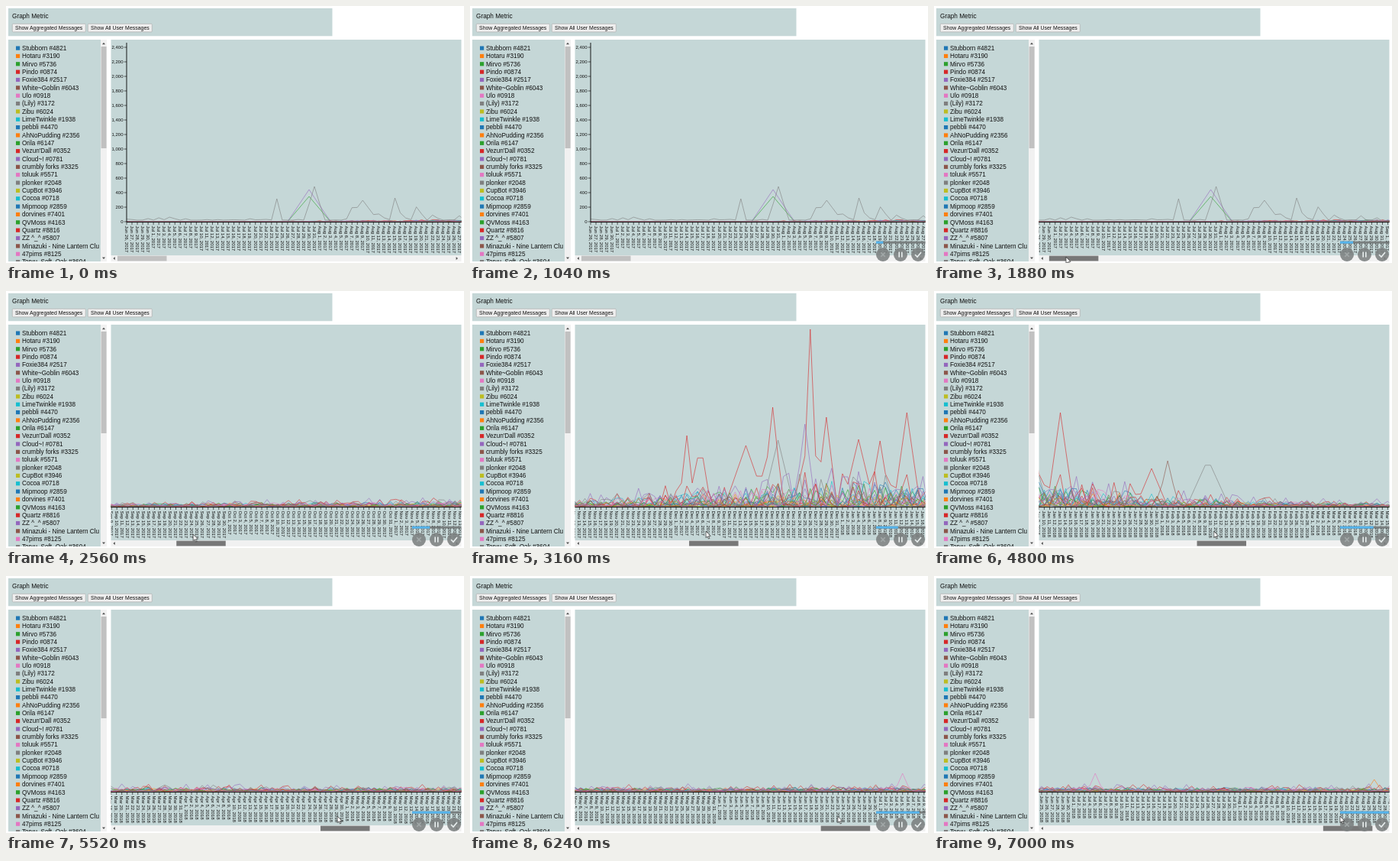
Recreate the animation shown at these times as an HTML page. Size 600x336 px, loop 7.08 s.

```html
<!DOCTYPE html>
<html lang="en">
<head>
<meta charset="utf-8">
<title>Graph Metric</title>
<style>
@property --scroll { syntax: '<number>'; inherits: true; initial-value: 0; }
html, body { margin: 0; width: 100%; height: 100%; overflow: hidden; background: #fff; }
#stage {
  display: block; width: 600px; height: 336px;
  font-family: 'Liberation Sans', Arial, sans-serif;
  animation: scroll 7080ms linear infinite;
}
text { fill: #111; white-space: pre; }
.panel { fill: #c5d7d7; }
.track { fill: #f1f1f1; }
.bar { fill: #c1c1c1; }
.arrow { fill: #505050; }
.button { fill: #eee; stroke: #a5a5a5; stroke-width: .6; }
.series { fill: none; stroke-width: .75; stroke-linejoin: round; opacity: .8; }
.axis { fill: none; stroke: #000; stroke-width: .9; }
.tick { fill: none; stroke: #000; stroke-width: .6; }
.small { font-size: 6px; }
#world { transform: translateX(calc(var(--scroll) * -1px)); }
#thumb, #pointer { transform: translateX(calc(var(--scroll) * 1px / 7.08)); }
#thumb { animation: press 7080ms step-end infinite; }
#pointer { animation: show-pointer 7080ms step-end infinite; }
#pointer path { animation: lift 7080ms linear infinite; }
#recorder { animation: show-recorder 7080ms step-end infinite; }
#progress { transform-origin: 532px 0; animation: fill 7080ms linear infinite; }
@keyframes scroll {
  0%, 23.2% { --scroll: 0; }
  26.55% { --scroll: 33.5; }
  44.63% { --scroll: 998.5; }
  56.5% { --scroll: 1150.5; }
  67.8% { --scroll: 1405; }
  77.97% { --scroll: 1883; }
  98.87%, 100% { --scroll: 2576; }
}
@keyframes press { 0% { fill: #c1c1c1; } 23%, 100% { fill: #787878; } }
@keyframes show-pointer { 0% { opacity: 0; } 20%, 100% { opacity: 1; } }
@keyframes lift { 0%, 26.55% { transform: translateY(14px); } 40%, 100% { transform: none; } }
@keyframes show-recorder { 0% { opacity: 0; } 1.1%, 100% { opacity: 1; } }
@keyframes fill { from { transform: scaleX(0); } to { transform: scaleX(1); } }
</style>
</head>
<body>
<svg id="stage" viewBox="0 0 600 336">
  <rect class="panel" x="3" y="3" width="424.5" height="36.3"/>
  <text x="8" y="16" font-size="8.25">Graph Metric</text>
  <rect class="button" x="8.3" y="23.3" width="96" height="10.6" rx="1"/>
  <rect class="button" x="107.3" y="23.3" width="84" height="10.6" rx="1"/>
  <g font-size="6.95">
    <text x="12" y="31.2">Show Aggregated Messages</text>
    <text x="111" y="31.2">Show All User Messages</text>
  </g>

  <svg x="3" y="44" width="121" height="290" viewBox="3 44 121 290">
    <rect class="panel" x="3" y="44" width="121" height="290"/>
    <g id="legend" font-size="8.2"></g>
  </svg>
  <rect class="track" x="124" y="44" width="8" height="290"/>
  <rect class="bar" x="124.6" y="53" width="7" height="133"/>
  <path class="arrow" d="M126 50.2l2-2.4 2 2.4z"/>
  <path class="arrow" d="M126 328.6l2 2.4 2-2.4z"/>

  <svg x="137.5" y="44" width="459" height="282" viewBox="137.5 44 459 282">
    <rect class="panel" x="137" y="44" width="460" height="282"/>
    <g id="world"></g>
  </svg>
  <rect class="track" x="137.5" y="326" width="459" height="8"/>
  <path class="arrow" d="M142.8 328l-2.4 2 2.4 2z"/>
  <path class="arrow" d="M589.6 328l2.4 2-2.4 2z"/>
  <rect id="thumb" x="146" y="326.6" width="64.5" height="6.8"/>

  <g id="recorder">
    <rect x="532" y="307.6" width="64.5" height="3" fill="#6c7070" opacity=".85"/>
    <rect id="progress" x="532" y="307.6" width="64.5" height="3" fill="#55b4ec"/>
    <g fill="#7c8080" opacity=".88">
      <circle cx="541" cy="325" r="9"/>
      <circle cx="564" cy="325" r="9"/>
      <circle cx="587" cy="325" r="9"/>
    </g>
    <g fill="none" stroke="#e8eeee" stroke-width="1.6">
      <path d="M538.3 322.3l5.4 5.4M543.7 322.3l-5.4 5.4" stroke="#a2a8a8"/>
      <path d="M562.2 321.5v7M565.8 321.5v7"/>
      <path d="M583 325l3 3 5-6"/>
    </g>
  </g>
  <g id="pointer">
    <path d="M168 314v8.6l2-1.8 1.4 3.2 1.4-.6-1.4-3.1h2.7z" fill="#fff" stroke="#222" stroke-width=".7"/>
  </g>
</svg>
<script>
const DAYS = 440, STEP = 7.03, LEFT = 158, BASE = 282;
const COLORS = ['#1f77b4', '#ff7f0e', '#2ca02c', '#d62728', '#9467bd',
  '#8c564b', '#e377c2', '#7f7f7f', '#bcbd22', '#17becf'];
const [ORANGE, GREEN, RED, PURPLE, BROWN, PINK, GREY] = [1, 2, 3, 4, 5, 6, 7];
const NAMES = ['Stubborn #4821', 'Hotaru #3190', 'Mirvo #5736', 'Pindo #0874', 'Foxie384 #2517',
  'White~Goblin #6043', 'Ulo #0918', '(Lily) #3172', 'Zibu #6024', 'LimeTwinkle #1938',
  'pebbli #4470', 'AhNoPudding #2356', 'Orila #6147', "Vezun'Dall #0352", 'Cloud~! #0781',
  'crumbly forks #3325', 'toluuk #5571', 'plonker #2048', 'CupBot #3946', 'Cocoa #0718',
  'Mipmoop #2859', 'dorvines #7401', 'QVMoss #4163', 'Quartz #8816', 'ZZ ^_^ #5807',
  'Minazuki - Nine Lantern Clu', '47pims #8125', 'Torvu_Soft_Oak #3604'];

// The outstanding spikes: series, day, height, half width in days
const SPIKES = [
  [GREY, 28, 30, 1], [PURPLE, 34, 42, 4], [GREEN, 34, 33, 4], [GREY, 35, 46, 2], [GREY, 44, 28, 3],
  [GREY, 50, 31, 1], [RED, 160, 93, 1.5], [RED, 162.5, 85, 2], [RED, 171, 80, 4], [RED, 176, 130, 2],
  [GREY, 177, 87, 3], [PURPLE, 182, 108, 2], [RED, 183, 232, 1.4], [RED, 186, 117, 2],
  [RED, 192, 88, 3], [RED, 196, 86, 2], [RED, 201, 123, 2.5], [RED, 218, 50, 3],
  [BROWN, 221, 60, 2], [GREY, 228.5, 62, 4], [PINK, 374, 24, 1.5], [ORANGE, 426, 16, 1.5]
];

const byId = id => document.getElementById(id);

function add(parent, tag, attrs, text) {
  const node = document.createElementNS('http://www.w3.org/2000/svg', tag);
  for (const key in attrs) node.setAttribute(key, attrs[key]);
  if (text) node.textContent = text;
  parent.append(node);
  return node;
}

function random(a, b) {
  const v = Math.sin(a * 127.1 + b * 311.7 + 7.3) * 43758.5453;
  return v - Math.floor(v);
}

// Activity grows over the first months and swells around the new year
const bell = (x, centre, width) => Math.exp(-(((x - centre) / width) ** 2));
const activity = day => Math.min(1, day / 100) ** 2 * (12 + 58 * bell(day, 187, 32));

function height(series, day) {
  const busy = [RED, PURPLE, BROWN, GREY].includes(series % 10) ? 1 : .5;
  const weight = busy * (.25 + .75 * random(series, 500));
  const noise = activity(day) * weight * random(day, series) ** 3;
  const early = series === GREY && day < 66 ? 2 + (day < 40 ? 4 : 20) * random(day, 99) ** 3 : 0;
  const spikes = SPIKES.filter(([s]) => s === series)
    .map(([, at, top, width]) => top * (1 - Math.abs(day - at) / width));
  return Math.max(noise, early, ...spikes);
}

const xOf = day => LEFT + day * STEP;
const world = byId('world');

NAMES.forEach((name, i) => {
  const y = 55 + i * 10.35, color = COLORS[i % 10];
  add(byId('legend'), 'rect', {x: 13, y: y - 2.5, width: 5.2, height: 5.2, fill: color});
  add(byId('legend'), 'text', {x: 21, y: y + 2.8}, name);
  const points = Array.from({length: DAYS}, (_, d) => `${xOf(d).toFixed(2)},${(BASE - height(i, d)).toFixed(2)}`);
  add(world, 'polyline', {class: 'series', stroke: color, points: points.join(' ')});
});

let ticks = '';
for (let d = 0; d < DAYS; d++) {
  const date = new Date(2017, 5, 26 + d)
    .toLocaleDateString('en-US', {month: 'short', day: 'numeric', year: 'numeric'});
  ticks += `M${xOf(d)} 282.6v3.4`;
  add(world, 'text', {class: 'small', transform: `translate(${xOf(d) - 2.2} 287.5) rotate(90)`}, date);
}
for (let v = 0; v <= 2400; v += 200) {
  const y = BASE - v * .095;
  ticks += `M${LEFT} ${y}h-3.4`;
  add(world, 'text', {class: 'small', x: LEFT - 4.5, y: y + 2.1, 'text-anchor': 'end'}, v.toLocaleString('en-US'));
}
add(world, 'path', {class: 'tick', d: ticks});
add(world, 'path', {class: 'axis', d: `M${LEFT} 48V282.6H${xOf(DAYS)}`});
</script>
</body>
</html>
```
